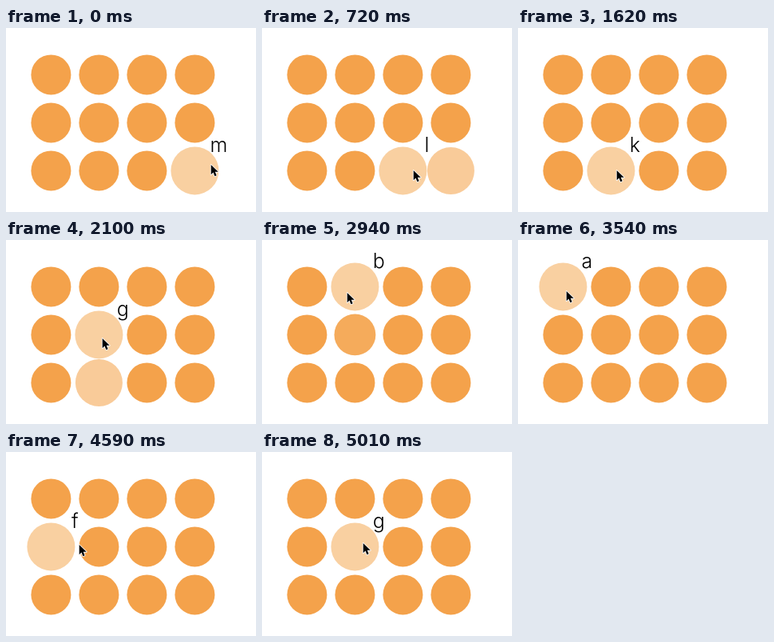
Animation, 313 px wide and 230 px high, one loop 5.16 s. Source, as an HTML page with a canvas:

```html
<!DOCTYPE html>
<html lang="en">
<head>
<meta charset="utf-8">
<title>Hover circles</title>
<style>
  html, body { margin: 0; width: 100%; height: 100%; overflow: hidden; background: #fff; }
  canvas { display: block; width: 313px; height: 230px; }
</style>
</head>
<body>
<canvas id="stage"></canvas>
<script>
const W = 313, H = 230, LOOP = 5160, STEP = 30, LAST = 5010;
const ORIGIN = { x: 56.4, y: 58.4 }, PITCH = 60, RADIUS = 25, GROWTH = 5;
const GROW_MS = 150, SHRINK_DELAY = 150, SHRINK_MS = 180;
const GLIDE_BEFORE = 270, GLIDE_AFTER = 185;
const REST_COLOR = [244, 162, 75], HOVER_COLOR = [249, 208, 161];

const canvas = document.getElementById('stage');
const ctx = canvas.getContext('2d');
const ratio = window.devicePixelRatio || 1;
canvas.width = W * ratio;
canvas.height = H * ratio;
ctx.scale(ratio, ratio);

const circles = ['abcd', 'fghi', 'jklm'].flatMap((row, r) =>
  [...row].map((letter, c) =>
    ({ letter, x: ORIGIN.x + PITCH * c, y: ORIGIN.y + PITCH * r })));

// Each visit: letter, time of entry, pointer's resting offset from the centre
const visits = [
  ['m', -1000, 20, -8], ['l', 535, 13, -1], ['k', 1240, 7, -1], ['g', 1915, 4, 4],
  ['b', 2660, -3, 7], ['a', 3100, 4, 5], ['f', 3850, 10, -3], ['g', 4660, 10, -5]
].map(([letter, start, dx, dy], i, all) => {
  const circle = circles.find(c => c.letter === letter);
  const end = i + 1 < all.length ? all[i + 1][1] : Infinity;
  return { circle, start, end, x: circle.x + dx, y: circle.y + dy };
});

const clamp = v => Math.max(0, Math.min(1, v));
const smooth = v => { v = clamp(v); return v * v * (3 - 2 * v); };
const mix = (a, b, k) => a + (b - a) * k;

function pointerAt(t) {
  return visits.reduce((p, v) => {
    const k = smooth((t - v.start + GLIDE_BEFORE) / (GLIDE_BEFORE + GLIDE_AFTER));
    return { x: mix(p.x, v.x, k), y: mix(p.y, v.y, k) };
  }, visits[0]);
}

function hoverAmount(circle, t) {
  return Math.max(0, ...visits.filter(v => v.circle === circle).map(v =>
    smooth((t - v.start) / GROW_MS) *
    (1 - smooth((t - v.end - SHRINK_DELAY) / SHRINK_MS))));
}

function drawCircle(c, t) {
  const amount = hoverAmount(c, t);
  const color = REST_COLOR.map((v, i) => mix(v, HOVER_COLOR[i], amount));
  ctx.fillStyle = `rgb(${color.map(Math.round)})`;
  ctx.beginPath();
  ctx.arc(c.x, c.y, RADIUS + GROWTH * amount, 0, Math.PI * 2);
  ctx.fill();
}

function drawLabel(t) {
  const { circle } = visits.find(v => t >= v.start && t < v.end);
  ctx.font = '300 25px Inter, "Liberation Sans", sans-serif';
  ctx.textAlign = 'center';
  ctx.fillStyle = '#000';
  ctx.fillText(circle.letter, circle.x + PITCH / 2, circle.y - 23.4);
}

const arrow = new Path2D('M.8 1.2V15.2L4 12.2 6.2 17.4 8.8 16.3 6.6 11.3H11.2Z');

function drawPointer(t) {
  const { x, y } = pointerAt(t);
  ctx.save();
  ctx.translate(Math.round(x), Math.round(y));
  ctx.scale(0.87, 0.87);
  ctx.lineWidth = 2;
  ctx.lineJoin = 'round';
  ctx.strokeStyle = '#fff';
  ctx.stroke(arrow);
  ctx.fillStyle = '#000';
  ctx.fill(arrow);
  ctx.restore();
}

function draw(now) {
  const t = Math.min(LAST, Math.floor((now % LOOP) / STEP) * STEP);
  ctx.fillStyle = '#fff';
  ctx.fillRect(0, 0, W, H);
  circles.forEach(c => drawCircle(c, t));
  drawLabel(t);
  drawPointer(t);
}

const startTime = performance.now();
function frame() {
  draw(performance.now() - startTime);
  requestAnimationFrame(frame);
}
frame();
</script>
</body>
</html>
```
